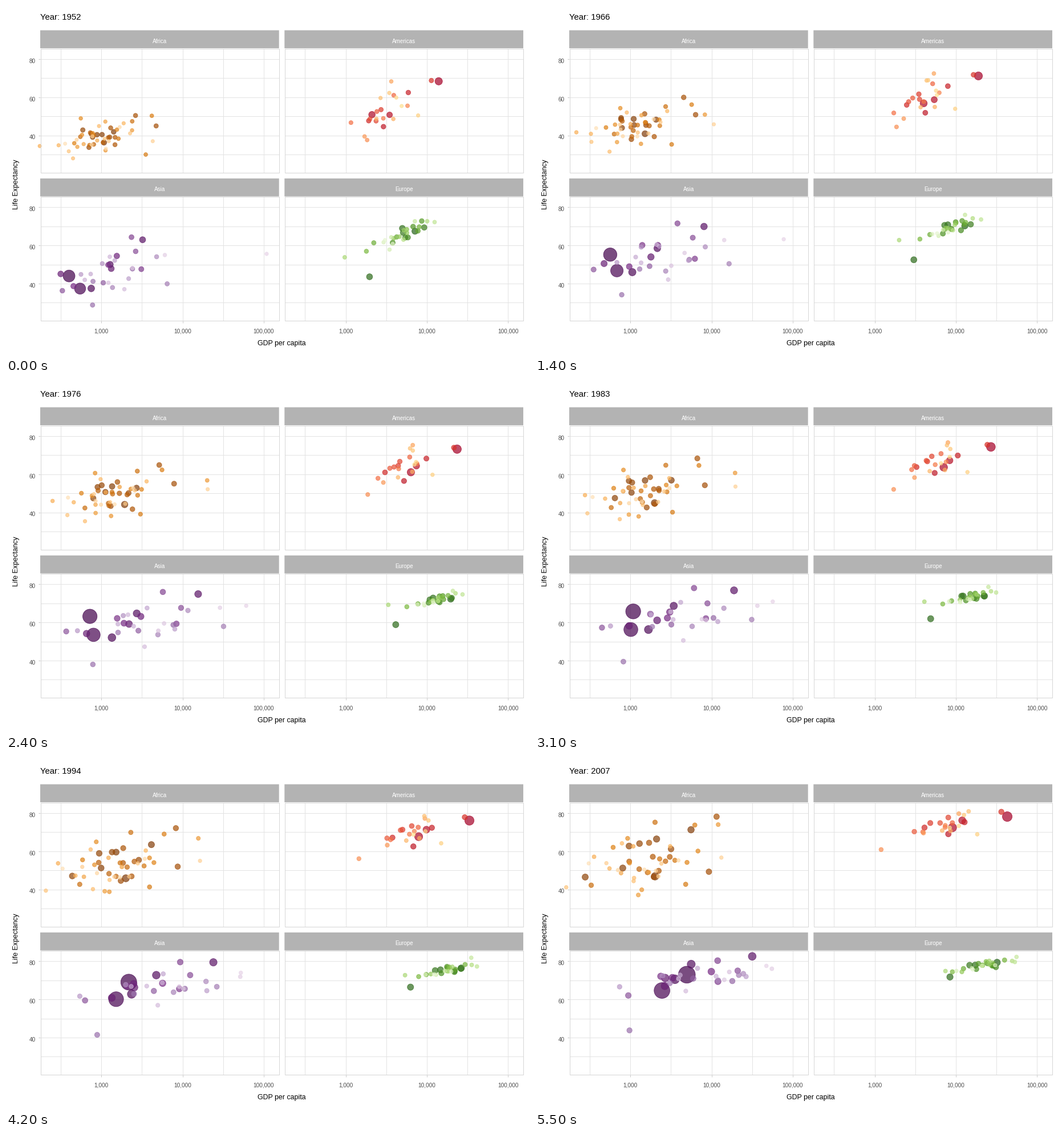
Animation of 917 by 611 pixels, one loop 5600 ms. Source, as a matplotlib script:

```python
import numpy as np
import matplotlib.pyplot as plt
from matplotlib.animation import FuncAnimation
from matplotlib.colors import LinearSegmentedColormap
from matplotlib.patches import Rectangle

W, H, DPI = 917, 611, 64
PX = 72 / DPI  # points per pixel
COL, ROW = 428.3, 259.4  # distance between panels
YEARS = np.arange(1952, 2008)
KNOTS = np.arange(1952, 2008, 5)  # dots move in straight lines between these
KEYS = (1952, 1977, 2007)
MAX_POP = 1318.7

plt.rcParams["font.family"] = "Liberation Sans"
rng = np.random.default_rng(8)


def x_px(log_gdp, col=0):
    return 167.2 + 142.4 * (log_gdp - 3) + COL * col


def y_px(life, row=0):
    return 93.05 + 3.34 * (80 - life) + ROW * row


def spread(n):
    """n evenly spread, shuffled values with a bell-shaped density."""
    p = (rng.permutation(n) + 0.5) / n
    return 0.55 * np.log(p / (1 - p))


def drift(n):
    """Standard scores that wander from one spread to a related one."""
    first, other = spread(n), spread(n)
    turn = np.linspace(0, 0.8, len(KNOTS))[:, None]
    return first * np.cos(turn) + other * np.sin(turn)


class Group:
    def __init__(self, name, col, row, growth, ramp):
        self.name, self.col, self.row, self.growth = name, col, row, growth
        self.ramp = LinearSegmentedColormap.from_list(name, ramp.split())
        self.dots = []

    def add(self, pop, years, log_gdp, life):
        x = np.interp(YEARS, years, x_px(log_gdp, self.col))
        y = np.interp(YEARS, years, y_px(life, self.row))
        pops = pop * np.interp(YEARS, (1952, 2007), (self.growth, 1))
        width = 2.41 * (2 + 10 * np.sqrt(pops / MAX_POP)) + 0.8
        self.dots.append((x, y, width))

    def lead(self, pop, *path):
        """A dot that stands out; path: gdp, life at the key years."""
        self.add(pop, KEYS, np.log10(path[::2]), np.array(path[1::2]))

    def cloud(self, n, top, decay, rho, *stats):
        """Dots around a moving centre.

        stats: mean and deviation of log gdp and of life at the key years.
        """
        gx, gs, lx, ls = (np.interp(KNOTS, KEYS, s)[:, None] for s in zip(*stats))
        u, v = drift(n), drift(n)
        v = rho * u + np.sqrt(1 - rho ** 2) * v
        shake = rng.normal(0, 0.12, (2, len(KNOTS), n))
        log_gdp = gx + gs * (u + shake[0])
        life = np.clip(lx + ls * (v + shake[1]), 28, 82.3)
        for k in range(n):
            self.add(top * np.exp(-decay * k), KNOTS, log_gdp[:, k], life[:, k])

    def plot(self, ax):
        self.dots.sort(key=lambda dot: -dot[2][-1])
        self.x, self.y, self.width = map(np.array, zip(*self.dots))
        colors = self.ramp(np.linspace(0, 1, len(self.dots)))
        colors[:, 3] = 0.7
        self.marks = ax.scatter(self.x[:, 0], self.y[:, 0], c=colors,
                                edgecolors=colors, linewidths=0.85 * PX, zorder=3)

    def show(self, i):
        self.marks.set_offsets(np.column_stack((self.x[:, i], self.y[:, i])))
        self.marks.set_sizes((self.width[:, i] * PX) ** 2)


africa = Group("Africa", 0, 0, 0.25, "#7f3b08 #b35806 #e08214 #fdb863 #fee0b6")
africa.lead(135, 1077, 36.3, 1982, 44.5, 2014, 46.9)
africa.lead(80, 1419, 41.9, 2785, 53.3, 5581, 71.3)
africa.lead(65, 781, 39.1, 796, 47.8, 278, 46.5)
africa.lead(44, 4725, 45, 8028, 55.5, 9270, 49.3)
africa.lead(12, 3521, 30, 3009, 39.5, 4797, 42.7)
africa.lead(6, 2388, 42.7, 21951, 57.4, 12057, 74)
africa.lead(1.5, 4293, 37, 21746, 52.8, 13206, 56.7)
africa.cloud(45, 75, 0.1, 0.35, (2.95, 0.27, 39.2, 4.8), (3.11, 0.29, 49.7, 6), (3.16, 0.36, 55.3, 8.5))

americas = Group("Americas", 1, 0, 0.42, "#a50026 #d73027 #f46d43 #fdae61 #fee090")
americas.lead(301, 13990, 68.4, 24073, 73.4, 42952, 78.2)
americas.lead(190, 2109, 50.9, 6660, 61.5, 9066, 72.4)
americas.lead(109, 3478, 50.8, 7675, 65, 11978, 76.2)
americas.lead(40, 5911, 62.5, 10079, 68.5, 12779, 75.3)
americas.lead(33, 11367, 68.8, 22091, 74.2, 36319, 80.7)
americas.lead(8.5, 1840, 37.6, 1874, 49.9, 1202, 60.9)
americas.cloud(19, 42, 0.17, 0.6, (3.47, 0.2, 53, 8.7), (3.72, 0.18, 64.5, 6), (3.88, 0.22, 73.4, 3.7))

asia = Group("Asia", 0, 1, 0.4, "#40004b #762a83 #9970ab #c2a5cf #e7d4e8")
asia.lead(1318, 400, 44, 741, 64, 4959, 73)
asia.lead(1110, 547, 37.4, 813, 54.2, 2452, 64.7)
asia.lead(223, 750, 37.5, 1383, 52.7, 3541, 70.6)
asia.lead(150, 3217, 63, 16610, 75.4, 31656, 82.6)
asia.lead(48, 331, 36.3, 371, 56.1, 944, 62.1)
asia.lead(32, 779, 28.8, 786, 38.4, 975, 43.8)
asia.lead(28, 6460, 39.9, 34168, 58.7, 21655, 72.8)
asia.lead(2.5, 108382, 55.6, 59265, 69.3, 47307, 77.6)
asia.cloud(25, 165, 0.15, 0.6, (3.15, 0.3, 47.5, 8), (3.56, 0.4, 61, 7.5), (3.85, 0.45, 72, 5))

europe = Group("Europe", 1, 1, 0.82, "#276419 #4d9221 #7fbc41 #b8e186 #e6f5d0")
europe.lead(82, 7144, 67.5, 20513, 72.5, 32170, 79.4)
europe.lead(71, 1969, 43.6, 4269, 59.5, 8458, 71.8)
europe.lead(4.6, 974, 53.8, 3528, 69.9, 7446, 74.9)
europe.lead(4.6, 10095, 72.7, 23311, 75.4, 49357, 80.2)
europe.cloud(26, 66, 0.15, 0.85, (3.7, 0.2, 65.5, 4.2), (4.12, 0.14, 72, 1.9), (4.34, 0.2, 77.9, 2.4))

groups = (africa, americas, asia, europe)

fig = plt.figure(figsize=(W / DPI, H / DPI), dpi=DPI, facecolor="white")
ax = fig.add_axes([0, 0, 1, 1])
ax.axis("off")


def label(x, y, text, size, color="black", **kw):
    return ax.text(x, y, text, fontsize=size * PX, color=color, **kw)


def line(xs, ys, color):
    ax.plot(xs, ys, color=color, lw=PX, zorder=1, solid_capstyle="butt")


def panel(g):
    left, right = 60.5 + COL * g.col, 478.5 + COL * g.col
    strip, top, bottom = (v + ROW * g.row for v in (42.5, 74.5, 291.5))
    for p in np.arange(2.5, 5.1, 0.5):
        line([x_px(p, g.col)] * 2, [top, bottom], "#e3e3e3")
    for life in range(30, 81, 10):
        line([left, right], [y_px(life, g.row)] * 2, "#e3e3e3")
    ax.add_patch(Rectangle((left, top), right - left, bottom - top, fill=False,
                           ec="#d6d6d6", lw=PX, zorder=4))
    ax.add_patch(Rectangle((left - 0.5, strip), right - left + 0.7, top - strip - 0.5,
                           fc="#b3b3b3", ec="none", zorder=5, snap=False))
    label((left + right) / 2, strip + 22.5, g.name, 9.9, "white", ha="center", zorder=6)
    if g.col == 0:
        for life in (40, 60, 80):
            y = y_px(life, g.row)
            line([57, 60], [y, y], "#c8c8c8")
            label(52, y + 6.8, str(life), 9.95, "#4d4d4d", ha="right")
    if g.row == 1:
        for p in (3, 4, 5):
            x = x_px(p, g.col)
            line([x, x], [551, 554.5], "#c8c8c8")
            label(x, 572, f"{10 ** p:,}", 9.95, "#4d4d4d", ha="center")


for g in groups:
    panel(g)
    g.plot(ax)

title = label(60, 24, "", 14.9)
label(483.7, 593.6, "GDP per capita", 12.4, ha="center")
label(18, 312.5, "Life Expectancy", 12.4, rotation=90, ha="center", va="center")
ax.set_xlim(0, W)
ax.set_ylim(H, 0)


def draw(i):
    title.set_text(f"Year: {YEARS[i]}")
    for g in groups:
        g.show(i)
    return [title] + [g.marks for g in groups]


anim = FuncAnimation(fig, draw, frames=len(YEARS), interval=100, repeat=True)
plt.show()
```
